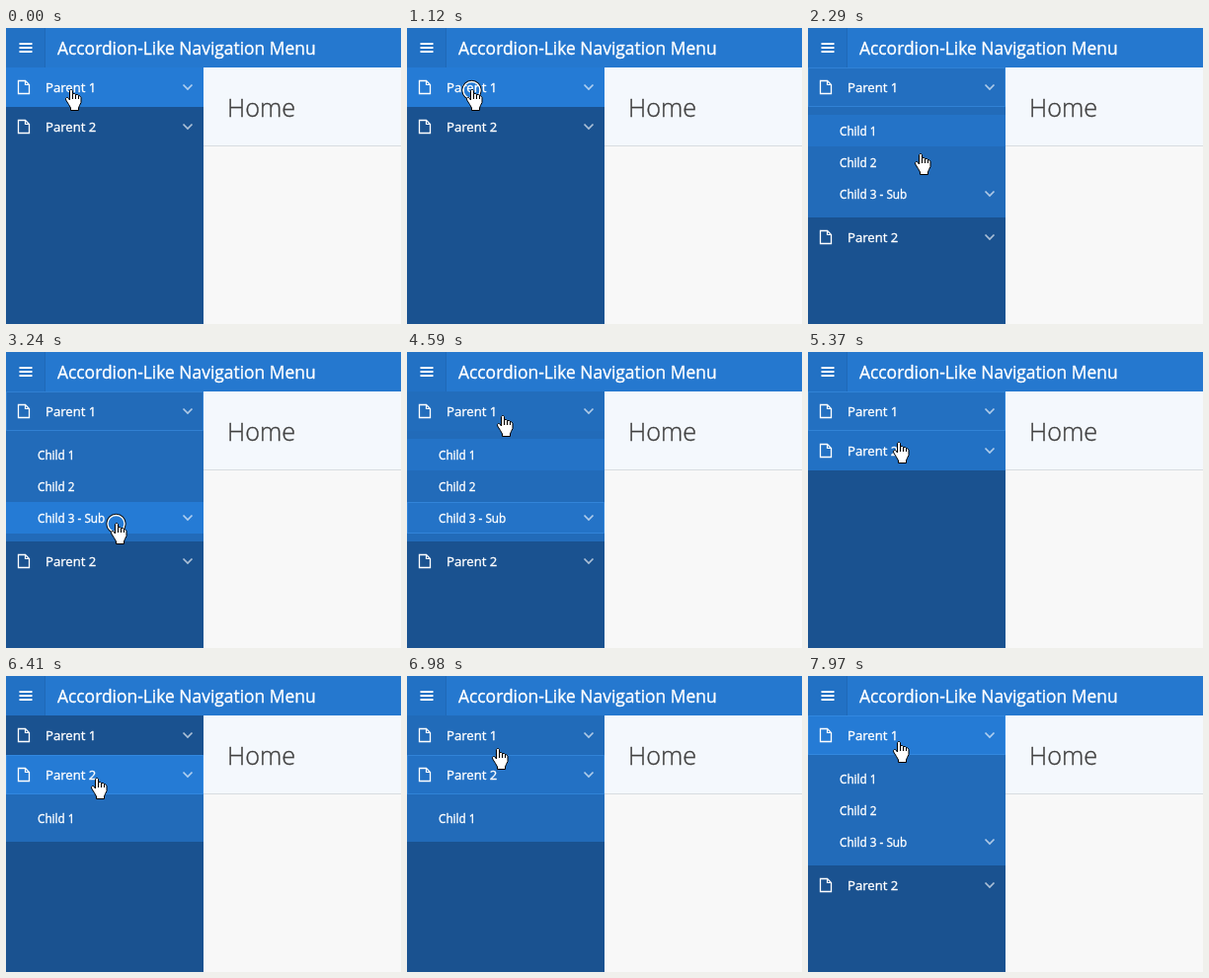
Write an HTML page with a canvas that moves like this. It is 400x300 px and loops after 8000 ms.

```html
<!DOCTYPE html>
<html lang="en">
<head>
<meta charset="utf-8">
<title>Accordion-Like Navigation Menu</title>
<style>
  html, body { margin: 0; width: 100%; height: 100%; overflow: hidden; background: #f8f8f8; }
  canvas { display: block; width: 400px; height: 300px; }
</style>
</head>
<body>
<canvas id="stage" width="400" height="300"></canvas>
<script>
const ctx = document.getElementById('stage').getContext('2d');
const LOOP = 8000;
const SIDE = 200;

const DARK = [26, 82, 144];
const PANEL = [34, 107, 185];
const HOVER = [37, 123, 213];

// Each step changes only the listed parts of the state; "lit" holds hover strength per row.
const STEPS = [
  { t: 0, tip: [65.5, 63], ring: false, open: '', sub: false, focus: '', lit: { p1: 1 } },
  { t: 1120, ring: true },
  { t: 1280, ring: false, open: 'p1', focus: 'p1' },
  { t: 2290, tip: [113.5, 128], lit: { p1: 0.25, c1: 0.5 } },
  { t: 2450, tip: [111.5, 174], lit: { c2: 0.2, c3: 0.6 } },
  { t: 2570, lit: { c3: 1 } },
  { t: 3240, ring: true },
  { t: 3360, ring: false },
  { t: 3490, sub: true, focus: 'c3' },
  { t: 4070, ring: true },
  { t: 4190, ring: false },
  { t: 4310, sub: false },
  { t: 4590, tip: [96.5, 65], lit: { p1: 0.1, c1: 0.5, c3: 0.5 } },
  { t: 4710, tip: [95.5, 51], lit: { p1: 1 } },
  { t: 4860, ring: true },
  { t: 4980, ring: false, open: '', focus: 'p1' },
  { t: 5250, tip: [93.5, 78], lit: { p1: 0.8 } },
  { t: 5370, tip: [91.5, 92], lit: { p1: 0.3, p2: 0.75 } },
  { t: 5520, tip: [91.5, 102], lit: { p2: 1 } },
  { t: 5680, tip: [91.5, 104] },
  { t: 6130, ring: true },
  { t: 6250, ring: false },
  { t: 6410, open: 'p2', focus: 'p2' },
  { t: 6860, tip: [91.5, 90] },
  { t: 6980, tip: [91.5, 74], lit: { p1: 0.6, p2: 0.4 } },
  { t: 7100, tip: [91.5, 67], lit: { p1: 1 } },
  { t: 7820, ring: true },
  { t: 7970, ring: false, open: 'p1', focus: 'p1' }
];

const stateAt = time => Object.assign({}, ...STEPS.filter(s => s.t <= time));

const rgb = c => `rgb(${c.map(Math.round)})`;
const mix = (a, b, k) => rgb(a.map((v, i) => v + (b[i] - v) * k));

function box(x, y, w, h, color) {
  ctx.fillStyle = color;
  ctx.fillRect(x, y, w, h);
}

// A hairline outline gives the text its slightly sturdy weight.
function label(text, x, y, size, color = '#fff', weight = 400) {
  ctx.font = `${weight} ${size}px "Open Sans", "Noto Sans", sans-serif`;
  ctx.fillStyle = ctx.strokeStyle = color;
  ctx.lineWidth = 0.35;
  ctx.lineJoin = 'round';
  ctx.fillText(text, x, y);
  ctx.strokeText(text, x, y);
  ctx.lineJoin = 'miter';
}

function trace(points, close) {
  ctx.beginPath();
  points.forEach(([x, y]) => ctx.lineTo(x, y));
  if (close) ctx.closePath();
}

function line(points, color, width, close) {
  trace(points, close);
  ctx.strokeStyle = color;
  ctx.lineWidth = width;
  ctx.stroke();
}

function fileIcon(y) {
  line([[12.5, y], [19.5, y], [23.5, y + 4], [23.5, y + 13], [12.5, y + 13]], '#fff', 1.3, true);
  line([[19.5, y], [19.5, y + 4], [23.5, y + 4]], '#fff', 1.2);
}

function chevron(y) {
  line([[179.5, y - 2.5], [184, y + 2], [188.5, y - 2.5]], 'rgba(255,255,255,.64)', 1.7);
}

function rowBack(s, id, y, h, base) {
  box(0, y, SIDE, h, mix(base, HOVER, s.lit[id] || 0));
  if (s.focus === id) {
    ctx.strokeStyle = 'rgba(64,150,236,.5)';
    ctx.lineWidth = 1;
    ctx.strokeRect(0.5, y + 0.5, SIDE - 1, h - 1);
  }
}

function parentRow(s, id, name, y) {
  const raised = s.open === id || s.focus === id;
  rowBack(s, id, y, 40, raised ? PANEL : DARK);
  fileIcon(y + 13.5);
  label(name, 40, y + 25, 13.15);
  chevron(y + 20);
}

function childRow(s, id, name, y, x = 32) {
  rowBack(s, id, y, 32, PANEL);
  label(name, x, y + 21, 11.75);
}

function panel(s, rows, y) {
  const h = rows.length * 32 + 16;
  box(0, y, SIDE, h, rgb(PANEL));
  rows.forEach(([id, name, x], i) => childRow(s, id, name, y + 8 + i * 32, x));
  return y + h;
}

function sidebar(s) {
  box(0, 40, SIDE, 260, rgb(DARK));
  parentRow(s, 'p1', 'Parent 1', 40);
  let y = 80;
  if (s.open === 'p1') {
    const rows = [['c1', 'Child 1'], ['c2', 'Child 2'], ['c3', 'Child 3 - Sub']];
    if (s.sub) rows.push(['s1', 'Sub Child 1', 44]);
    y = panel(s, rows, y);
    chevron(168);
  }
  parentRow(s, 'p2', 'Parent 2', y);
  if (s.open === 'p2') panel(s, [['d1', 'Child 1']], y + 40);
}

function page() {
  box(0, 0, 400, 300, '#f8f8f8');
  box(SIDE, 40, 200, 79, '#f4f8fd');
  box(SIDE, 119, 200, 1, '#d8dce0');
  label('Home', 224, 90, 25.3, '#404040', 300);
  box(0, 0, 400, 40, '#2578cf');
  box(0, 0, 39, 40, '#2271c4');
  box(39, 0, 1, 40, '#1f69b7');
  for (const y of [15, 19, 23]) box(13.5, y, 13, 2, '#fff');
  label('Accordion-Like Navigation Menu', 52, 27, 17.43);
}

function clickRing([x, y]) {
  for (const [r, w, color] of [[9.6, 1.2, '#111'], [8.5, 1.3, '#fff']]) {
    ctx.beginPath();
    ctx.arc(x, y, r, 0, Math.PI * 2);
    ctx.strokeStyle = color;
    ctx.lineWidth = w;
    ctx.stroke();
  }
}

const HAND = [
  [4.5, 1.5], [5.5, 0.5], [6.5, 0.5], [7.5, 1.5], [7.5, 4.5], [9.5, 4.5], [10.5, 5.5],
  [12.5, 5.5], [13.5, 6.5], [14.5, 6.5], [16, 8.5], [16, 13.5], [14.5, 16.5], [13.5, 19],
  [13.5, 21.5], [5.5, 21.5], [5.5, 19], [3.5, 15.5], [0.7, 11], [0.5, 9.5], [1.5, 8.5],
  [2.5, 8.5], [4.5, 11]
];

function hand([x, y]) {
  ctx.save();
  ctx.translate(x - 5.5, y - 1);
  trace(HAND, true);
  ctx.fillStyle = '#fff';
  ctx.fill();
  line(HAND, '#000', 1, true);
  for (const [fx, fy] of [[7.5, 4.5], [10.5, 5.5], [13.5, 6.5]]) {
    line([[fx, fy], [fx, 10]], '#000', 1);
  }
  ctx.restore();
}

function draw(now) {
  const s = stateAt(now % LOOP);
  page();
  sidebar(s);
  if (s.ring) clickRing(s.tip);
  hand(s.tip);
}

let start;
function tick(now) {
  start ??= now;
  draw(now - start);
  requestAnimationFrame(tick);
}
draw(0);
requestAnimationFrame(tick);
</script>
</body>
</html>
```
